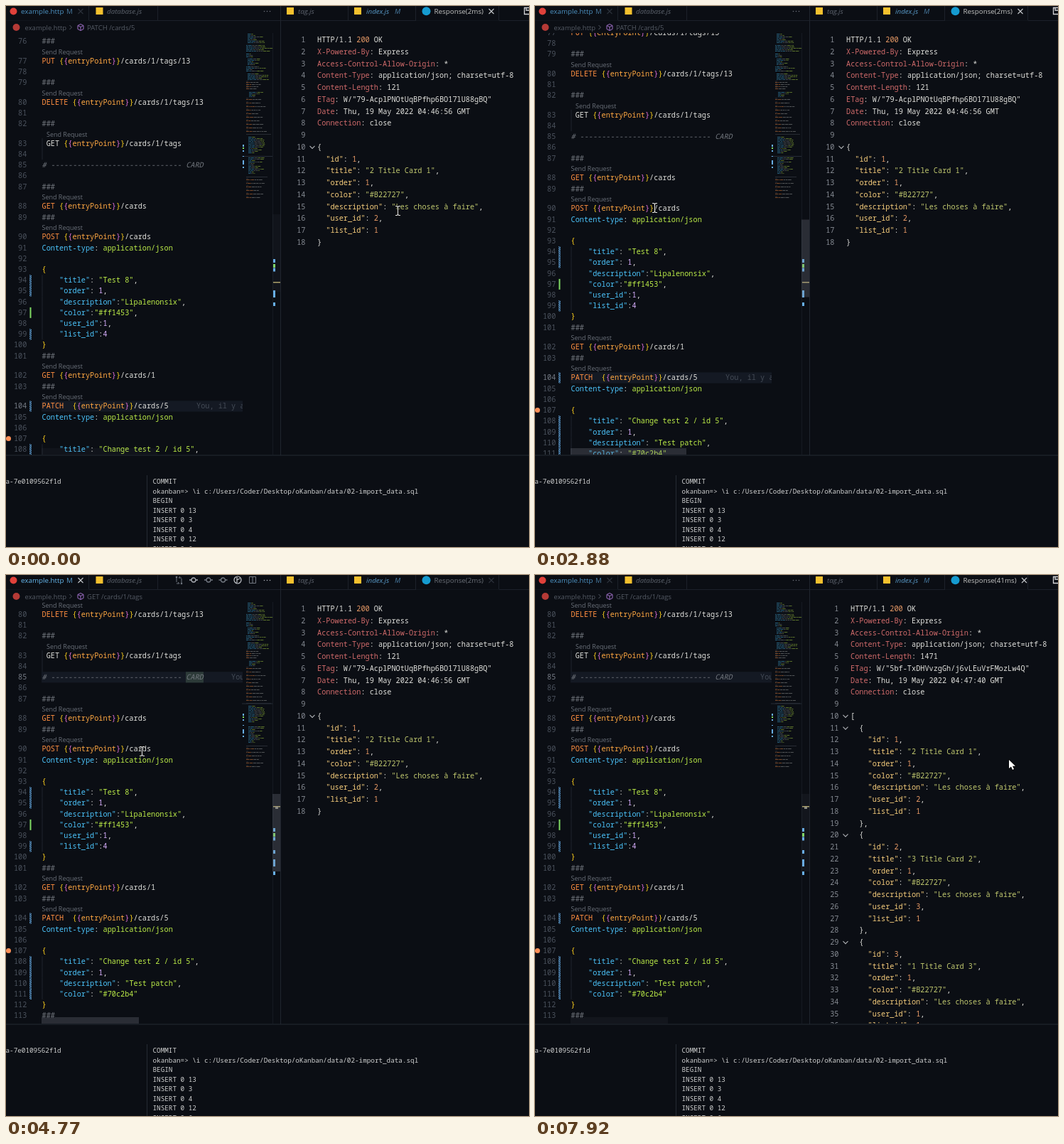
Write an HTML page with a canvas that moves like this. It is 736 by 761 pixels and loops after 8 s.

```html
<!DOCTYPE html>
<html lang="en">
<head>
<meta charset="utf-8">
<title>REST client</title>
<style>
html, body { margin: 0; width: 100%; height: 100%; overflow: hidden; background: #0b0e14; }
canvas { display: block; }
</style>
</head>
<body>
<canvas id="stage" width="736" height="761"></canvas>
<script>
const ctx = document.getElementById('stage').getContext('2d');
const LOOP = 8000, CLICK = 4220, SYMBOL = 4500, HOVER = 5300, REPLY = 7030, LEAVE = 7400;
const MONO = '"Noto Sans Mono", monospace', UI = '"Open Sans", sans-serif';
const CODE_FONT = `500 10.24px ${MONO}`, CELL = 6.144;
const C = {
  bg: '#0b0e14', line: '#1c212a', text: '#e0e0dc', dim: '#5d636d', comment: '#72777e', number: '#4b525d',
  orange: '#ff8f40', amber: '#ffa842', gold: '#ffd21c', pink: '#e070dc', cyan: '#4cc4fb',
  lime: '#bcec48', lilac: '#d9b0ff', blue: '#67aee8', green: '#7fd962', yellow: '#f5c12e', red: '#e0413a'
};

function rect(x, y, w, h, color) {
  ctx.fillStyle = color;
  ctx.fillRect(x, y, w, h);
}
function disc(x, y, r, color) {
  ctx.fillStyle = color;
  ctx.beginPath();
  ctx.arc(x, y, r, 0, 7);
  ctx.fill();
}
function stroke(d, color, width = 1) {
  ctx.strokeStyle = color;
  ctx.lineWidth = width;
  ctx.stroke(new Path2D(d));
}
// Places text by its visual centre line, on a whole-pixel baseline.
function label(s, x, y, color, font, align = 'left') {
  ctx.font = font;
  ctx.fillStyle = color;
  ctx.textAlign = align;
  ctx.fillText(s, x, Math.round(y + 3.5));
}
const ui = (s, x, y, color, size = 9.8, style = '') => label(s, x, y, color, `${style} ${size}px ${UI}`);
const mono = (s, x, y, color, style = '') => label(s, x, y, color, `${style} ${CODE_FONT}`);
const cross = (x, y, color) => stroke(`M${x - 3.5} ${y - 3.5}l7 7m0-7l-7 7`, color, 1.1);
const dots = (x, y, color) => [-4, 0, 4].forEach(d => disc(x + d, y, 0.8, color));

function clipped(x, y, w, h, draw) {
  ctx.save();
  ctx.beginPath();
  ctx.rect(x, y, w, h);
  ctx.clip();
  draw();
  ctx.restore();
}

// Splits a line by [pattern, color] rules, first match wins.
function tokens(s, rules) {
  const out = [];
  for (let i = 0; i < s.length;) {
    let piece = s[i], color = C.text;
    for (const [pattern, c] of rules) {
      pattern.lastIndex = i;
      const m = pattern.exec(s);
      if (m) { piece = m[0]; color = c; break; }
    }
    out.push([piece, color, i]);
    i += piece.length;
  }
  return out;
}
const REQUEST_RULES = [
  [/^###/y, C.comment], [/^# -+ CARD/y, C.comment], [/^(PUT|DELETE|GET|POST|PATCH)/y, C.orange],
  [/application\/json/y, C.lime], [/\/[\w/]+/y, C.text],
  [/entryPoint/y, C.amber], [/(?<=\{)\{|\}(?=\})/y, C.pink], [/[{}]/y, C.gold],
  [/Content-type/y, C.cyan], [/"\w+"(?=:)/y, C.cyan], [/"[^"]*"/y, C.lime], [/\d+/y, C.lilac]
];
const HEAD_RULES = [[/^[\w-]+(?=:)/y, '#d06a6a'], [/\b200\b/y, '#e89a66'], [/\S+/y, C.text]];
const BODY_RULES = [[/"\w+"(?=:)/y, '#f6cd7c'], [/"[^"]*"/y, '#bfc76e'], [/\d+/y, '#e89a66']];

function codeLine(s, x, y, rules) {
  const style = s.startsWith('# ') ? 'italic' : '';
  for (const [piece, color, col] of tokens(s, rules))
    if (piece.trim()) mono(piece, x + col * CELL, y, color, style);
}

const URL_BASE = '{{entryPoint}}/cards';
const JSON_TYPE = 'Content-type: application/json';
const SOURCE = [
  '###', `PUT ${URL_BASE}/1/tags/13`, '', '###', `DELETE ${URL_BASE}/1/tags/13`, '', '###',
  ` GET ${URL_BASE}/1/tags`, '', `# ${'-'.repeat(30)} CARD`, '', '###', `GET ${URL_BASE}`, '###',
  `POST ${URL_BASE}`, JSON_TYPE, '', '{', '    "title": "Test 8",', '    "order": 1,',
  '    "description":"Lipalenonsix",', '    "color":"#ff1453",', '    "user_id":1,', '    "list_id":4',
  '}', '###', `GET ${URL_BASE}/1`, '###', `PATCH  ${URL_BASE}/5`, JSON_TYPE, '', '{',
  '    "title": "Change test 2 / id 5",', '    "order": 1,', '    "description": "Test patch",',
  '    "color": "#70c2b4"', '}', '###', `GET ${URL_BASE}/5/tags`
];
let rowY = 49.2;
const ROWS = SOURCE.map((text, i) => {
  const lens = /entryPoint/.test(text);
  if (i) rowY += 15.2 + (lens ? 12.6 : 0);
  return { text, lens, y: rowY, n: 76 + i };
});

const header = (length, tag, time) => [
  'HTTP/1.1 200 OK', 'X-Powered-By: Express', 'Access-Control-Allow-Origin: *',
  'Content-Type: application/json; charset=utf-8', `Content-Length: ${length}`, `ETag: W/"${tag}"`,
  `Date: Thu, 19 May 2022 04:${time} GMT`, 'Connection: close', ''
];
const card = (id, user, pad, end) => [
  '{', `  "id": ${id},`, `  "title": "${user} Title Card ${id}",`, '  "order": 1,', '  "color": "#B22727",',
  '  "description": "Les choses à faire",', `  "user_id": ${user},`, '  "list_id": 1', '}' + end
].map(s => pad + s);
const ONE = [...header(121, '79-AcplPNOtUqBPfhp6BO17lU88gBQ', '46:56'), ...card(1, 2, '', '')];
const MANY = [
  ...header(1471, '5bf-TxDHVvzgGh/j6vLEuVrFMozLw4Q', '47:40'), '[',
  ...card(1, 2, '  ', ','), ...card(2, 3, '  ', ','), ...card(3, 1, '  ', ',')
];

// Pointer legs: start, end, number of steps, control point, end point.
const LEGS = [
  [140, 1070, 8, 520, 150, 445, 63],
  [1210, 1210, 1, 445, 55, 445, 47],
  [1490, 1940, 4, 330, 60, 215, 95],
  [2240, 2880, 6, 185, 190, 168, 284],
  [3450, 4220, 7, 240, 210, 285, 146],
  [4500, 5300, 7, 177, 336, 62, 194],
  [5750, 5750, 1, 62, 194, 62, 193],
  [7400, 7920, 5, 600, 330, 667, 260]
];
function pointer(t) {
  let x = 551, y = 288;
  for (const [start, end, steps, cx, cy, ex, ey] of LEGS) {
    if (t < start) break;
    const k = end > start ? Math.floor((t - start) / (end - start) * (steps - 1) + 0.001) + 1 : steps;
    const u = Math.min(k, steps) / steps, v = 1 - u;
    x = v * v * x + 2 * u * v * cx + u * u * ex;
    y = v * v * y + 2 * u * v * cy + u * u * ey;
  }
  return [x, y];
}

function drawPointer(t) {
  const [x, y] = pointer(t);
  ctx.save();
  ctx.translate(Math.round(x), Math.round(y));
  ctx.lineJoin = 'round';
  if (t >= HOVER) {
    const shape = t < LEAVE
      ? 'M-2 1Q0-1 2 1V7L7 8Q8 9 8 11L7 17H-1L-5 11Q-5 9-2 11Z'
      : 'M0 0V12L3 9.5L5 14L7 13L5 8.7H9Z';
    stroke(shape, '#000', 1.5);
    ctx.fillStyle = '#fff';
    ctx.fill(new Path2D(shape));
    if (t < LEAVE) stroke('M2.5 8v2m2.5-1.5v2', '#555', 0.7);
  } else {
    const beam = 'M-3-6.5H-1L.5-5.5L2-6.5H4M.5-5.5V5.5M-3 6.5H-1L.5 5.5L2 6.5H4';
    stroke(beam, '#000', 2.2);
    stroke(beam, '#e8e8e8', 1.1);
  }
  ctx.restore();
}

function drawTabs(t) {
  const focus = t >= CLICK && t < REPLY, icon = '#a9adb4';
  rect(0, 20, 736, 1, '#11151c');
  [116, 213, 481, 576, 693].forEach(x => rect(x, 0, 1, 20, C.line));
  rect(117, 20, 269, 1, C.line);
  rect(387, 20, 190, 1, C.line);
  rect(694, 20, 42, 1, C.line);
  disc(10.5, 7.5, 5, C.red);
  ui('example.http', 21, 7.5, focus ? '#66b9ef' : '#4d92c2');
  ui('M', 85, 7.5, focus ? '#5a9ccb' : '#47799e');
  cross(105, 7.5, focus ? '#c5c8cc' : '#2c323b');
  [[126.5, 'database.js', 142, C.dim], [395, 'tag.js', 411, C.dim], [490, 'index.js', 507, '#5a9ccb']]
    .forEach(([sx, s, x, color]) => {
      rect(sx, 2, 10, 10, C.yellow);
      ui(s, x, 7.5, color, 9.8, 'italic');
    });
  ui('M', 547, 7, '#47799e', 9.8, 'italic');
  dots(367.5, 7.5, focus ? icon : '#6a6f77');
  if (focus) {
    stroke('M240 3v7m7-5v7M240 12h4l-2-2m5-6h-4l2-2', '#6f757e');
    disc(240, 3, 1.3, '#6f757e');
    disc(247, 12, 1.3, '#6f757e');
    [[264, icon], [285, '#747a83'], [305.5, '#747a83']].forEach(([x, color]) =>
      stroke(`M${x - 6} 7h3m6 0h3M${x - 3} 7a3 3 0 1 0 6 0a3 3 0 1 0-6 0`, color, 1.3));
    stroke('M321 7a5 5 0 1 0 10 0a5 5 0 1 0-10 0M325 3v8m0-4l4-2', '#c5c8cc', 1.2);
    stroke('M342.5 2.5h9v9h-9zM347 2.5v9', '#747a83');
  } else {
    stroke('M729.5 2.5h9v9h-9zM732 3v3h6', '#d5d6d8', 1.3);
  }
  disc(591.5, 7.3, 6, '#159bd0');
  ui(`Response(${t < REPLY ? 2 : 41}ms)`, 602.5, 7.5, focus ? '#6a6f77' : '#c5c6c4');
  cross(t < REPLY ? 683 : 688.5, 7.5, focus ? '#2c323b' : '#c5c8cc');

  disc(14.5, 30, 5, '#b53a36');
  ui('example.http', 26.5, 30, '#555b65', 9.5);
  stroke('M89.5 27l3 3l-3 3', '#555b65');
  stroke('M105 25.5l4 2v5l-4 2l-4-2v-5zM101 27.5l4 2l4-2M105 29.5v5', '#a070c8');
  ui(t < SYMBOL ? 'PATCH /cards/5' : 'GET /cards/1/tags', 114, 30, '#555b65', 9.5);
}

function drawChange(n, y) {
  if (n === 97) rect(33.5, y - 7.5, 2, 15, C.green);
  if (![94, 95, 99, 104, 108, 109, 110, 111].includes(n)) return;
  clipped(33, y - 7.6, 3, 15.2, () => {
    for (let k = -8; k < 10; k += 2.6) stroke(`M32 ${y + k + 2}l5-4`, C.blue, 1.1);
  });
}

function drawRequests(t) {
  const scroll = t < 2880 ? 0 : t < 3310 ? 40 : 80;
  const current = t < CLICK ? 104 : 85;
  clipped(0, 38, 333, 593, () => {
    for (const { text, lens, n, y: base } of ROWS) {
      const y = base - scroll;
      if (y < 20 || y > 655) continue;
      if (n === current) {
        rect(50, y - 7.6, 283, 15.2, '#141923');
        if (n === 104 || t >= SYMBOL) mono('You, il y a', n === 104 ? 268 : 317, y, '#444b56');
      }
      if (n === 83 || n === 84 || text.startsWith('    ')) rect(50.5, y - 7.6, 1, 15.2, '#20252e');
      if (lens) ui('Send Request', n === 83 ? 57 : 50.5, y - 13,
        n === 88 && t >= HOVER && t < LEAVE ? '#e6b450' : '#6a7079', 9);
      if (n === 85 && t >= SYMBOL && t < REPLY) rect(253, y - 7.6, 25, 15.2, '#2c3a38');
      codeLine(text, 50.5, y, REQUEST_RULES);
      label(n, 29.3, y, n === current ? '#767c86' : C.number, CODE_FONT, 'right');
      drawChange(n, y);
      if (n === 107) disc(3.5, y, 3.5, '#ff9057');
      const caret = t >= 5180 && t < 5750 || t >= 6350 && t < 6750;
      if (n === 85 && caret) rect(277, y - 7.6, 1, 15.2, '#e6b450');
    }
  });
  drawScrollbars(t, scroll);
}

function drawScrollbars(t, scroll) {
  let alpha = 0;
  if (t < 400) alpha = 0.2 * (1 - t / 400);
  else if (t >= 1640) alpha = t < LEAVE ? 1 : Math.max(0, 1 - (t - LEAVE) / 700);
  rect(375, 38, 1, 593, '#151a22');
  const moved = t >= CLICK;
  rect(376, moved ? 325 : 388, 10, 1.5, '#b0a368');
  if (t >= SYMBOL) rect(379, 326, 4, 3, '#8b8c80');
  [[356, 5], [368.5, 5], [400, 10], [417, 5]].forEach(([y, h]) => rect(376, y, 3, h, C.blue));
  if (moved) rect(376, 387, 3, 5, C.blue);
  rect(376, 363, 3, 5, C.green);
  const shade = `rgba(125,130,140,${0.27 * alpha})`;
  rect(375, 293 + scroll * 0.1875, 11, 109, shade);
  rect(50, 622, t < SYMBOL ? 163 : 137, 9, shade);
}

// Minimap sections: top, bottom, row pitch, indent, shortest and longest row.
const MAP = [
  [39, 53, 2, 2, 8, 24], [55, 65, 2, 0, 18, 34], [67, 72, 2, 0, 4, 16], [74, 83, 2, 2, 6, 18],
  [85, 92, 2, 0, 8, 28], [95, 104, 2, 2, 14, 30], [107, 118, 3, 0, 12, 30], [121, 128, 2, 4, 6, 18],
  [131, 177, 5, 0, 14, 28], [184, 208, 2, 3, 6, 24], [213, 237, 2, 3, 6, 22], [244, 274, 5, 0, 14, 24]
];
function drawMinimap(t) {
  let seed = 7;
  const random = () => (seed = seed * 16807 % 2147483647) / 2147483647;
  ctx.globalAlpha = 0.45;
  for (const [top, bottom, pitch, indent, low, high] of MAP) {
    for (let y = top; y < bottom; y += pitch) {
      const width = low + random() * (high - low);
      const calls = pitch > 2;
      const colors = calls ? [C.orange, '#a8aaa8', '#a8aaa8'] : [C.cyan, '#8c9295', C.lime];
      if (calls) rect(338, y - 1.5, 3, 0.8, C.dim);
      for (let x = 0; x < width;) {
        const w = 1 + random() * 4;
        rect(338 + indent + x, y, w, 1, colors[Math.min(2, Math.floor(x / width * 3))]);
        x += w + 0.7;
      }
    }
  }
  rect(338, 180, 35, 0.8, C.dim);
  rect(338, 240, 30, 0.8, C.dim);
  ctx.globalAlpha = 1;
  rect(332, t < CLICK ? 211 : 180.5, 43, 1, '#272d37');
  [[195, 3], [203, 2], [211, 1], [217, 6], [226, 2]].forEach(([y, h]) => rect(333, y, 2, h, C.blue));
  rect(333, 199, 2, 2, C.green);
}

function drawResponse(t) {
  const lines = t < REPLY ? ONE : MANY, x = t < REPLY ? 438 : 444;
  clipped(387, 22, 349, 609, () => lines.forEach((s, i) => {
    const y = 47.6 + i * 16.75;
    label(i + 1, x - 16.5, y, '#858a92', CODE_FONT, 'right');
    codeLine(s, x, y, i < 9 ? HEAD_RULES : BODY_RULES);
    if (/^ *[[{]$/.test(s)) stroke(`M${x - 10.5} ${y - 1.5}l3.5 3.5l3.5-3.5`, '#b0b3b8', 1.1);
  }));
}

const SHELL = [
  'COMMIT', 'okanban=> \\i c:/Users/Coder/Desktop/oKanban/data/02-import_data.sql', 'BEGIN',
  ...[13, 3, 4, 12, 6].map(n => `INSERT 0 ${n}`)
];
function drawTerminal() {
  const font = `500 9.3px ${MONO}`;
  label('a-7e0109562f1d', -0.5, 668.6, '#d0d1d1', font);
  SHELL.forEach((s, i) => label(s, 206.5, 668.6 + i * 13.55, '#d0d1d1', font));
  rect(198, 660, 1, 101, '#252a33');
}

function frame(now) {
  const t = now % LOOP;
  rect(0, 0, 736, 761, C.bg);
  drawTabs(t);
  drawRequests(t);
  drawMinimap(t);
  drawResponse(t);
  rect(386, 0, 1, 632, '#20252e');
  rect(0, 631.5, 736, 1, '#252a33');
  drawTerminal();
  drawPointer(t);
  requestAnimationFrame(frame);
}
requestAnimationFrame(frame);
</script>
</body>
</html>
```
